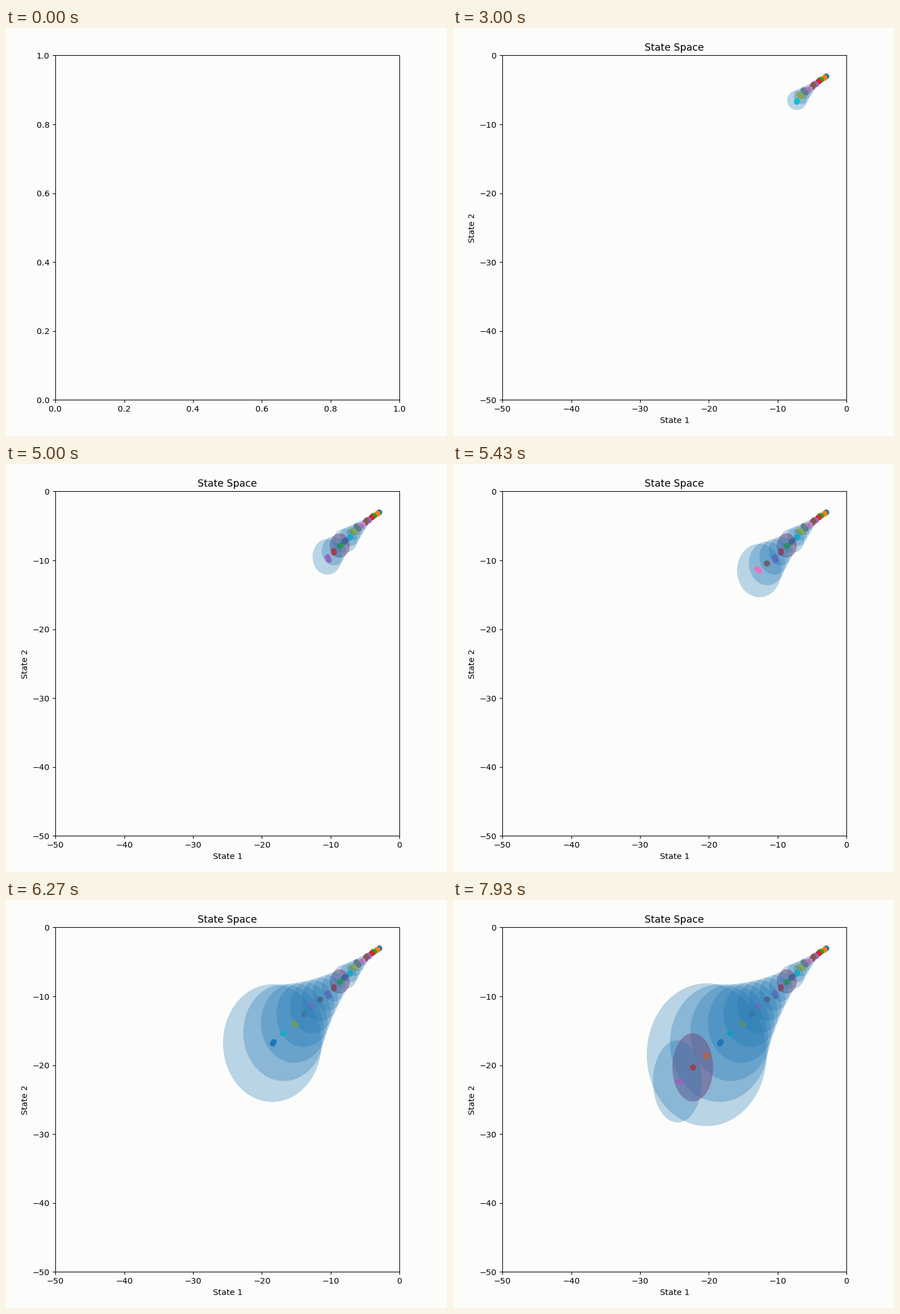
Write a matplotlib script that moves like this. It is 778 by 720 pixels and loops after 8000 ms.

```python
import numpy as np
import matplotlib.pyplot as plt
from matplotlib.animation import FuncAnimation
from matplotlib.patches import Ellipse

W, H, DPI = 778, 720, 104
LEFT, TOP, WIDTH, HEIGHT = 87.05, 48.45, 607.4, 607.9
PAPER = "#fcfdfb"
FRAMES, INTERVAL = 200, 40

STEPS = 25
MEASURED = (12, 23)               # a measurement shrinks the spread here
GAIN = 1.1                        # growth of the state per step
DRIFT = 0.04                      # process noise
SENSOR = np.array([4.0, 8.0])     # measurement noise
FIRST_FRAME, STEP_FRAMES, HOLD_FRAMES = 48, 5, 29


def simulate():
    """Yield (frame, estimate, truth, spread, measured) for each step."""
    rng = np.random.default_rng(4)
    growth, spread, clock = 1.0, np.full(2, 0.1), 29
    for step in range(1, STEPS + 1):
        measured, resumed = step in MEASURED, step - 1 in MEASURED
        if step > 1:
            clock += HOLD_FRAMES if resumed else STEP_FRAMES
        if step > 1 and not resumed:
            growth *= GAIN
            spread = GAIN ** 2 * spread + DRIFT
        if measured:
            spread = 1 / (1 / spread + 1 / SENSOR)

        settle = growth ** -3.5
        estimate = -np.array([3 * growth + 0.15 * (1 - settle),
                              3 * growth * (0.915 + 0.085 * settle)])
        error = 0.22 * (1 - settle) * rng.normal(size=2)
        truth = estimate if measured or resumed else estimate + error
        yield max(FIRST_FRAME, clock), estimate, truth, spread, measured


def make_axes(low, high):
    box = [LEFT / W, 1 - (TOP + HEIGHT) / H, WIDTH / W, HEIGHT / H]
    axes = fig.add_axes(box, label=f"{low}..{high}", facecolor=PAPER)
    axes.set(xlim=(low, high), ylim=(low, high))
    return axes


plt.rcParams["font.family"] = "DejaVu Sans"
fig = plt.figure(figsize=((W + 1e-9) / DPI, (H + 1e-9) / DPI), dpi=DPI,
                 facecolor=PAPER)
blank = make_axes(0, 1)
ax = make_axes(-50, 0)
ax.set(title="State Space", xlabel="State 1", ylabel="State 2")

layers = []
for index, (start, estimate, truth, spread, measured) in enumerate(simulate()):
    style = (dict(color="crimson") if measured
             else dict(facecolor="C0", edgecolor="none"))
    region = ax.add_patch(Ellipse(estimate, *(2 * spread), alpha=0.3, **style))
    dots = ax.scatter(*np.transpose([truth, estimate]), color=f"C{index % 10}")
    layers.append((start, region, dots))


def update(frame):
    started = frame >= FIRST_FRAME
    blank.set_visible(not started)
    ax.set_visible(started)
    for start, *artists in layers:
        for artist in artists:
            artist.set_visible(frame >= start)
    return []


anim = FuncAnimation(fig, update, frames=FRAMES, interval=INTERVAL,
                     init_func=lambda: update(0), repeat=True, repeat_delay=0)
plt.show()
```
